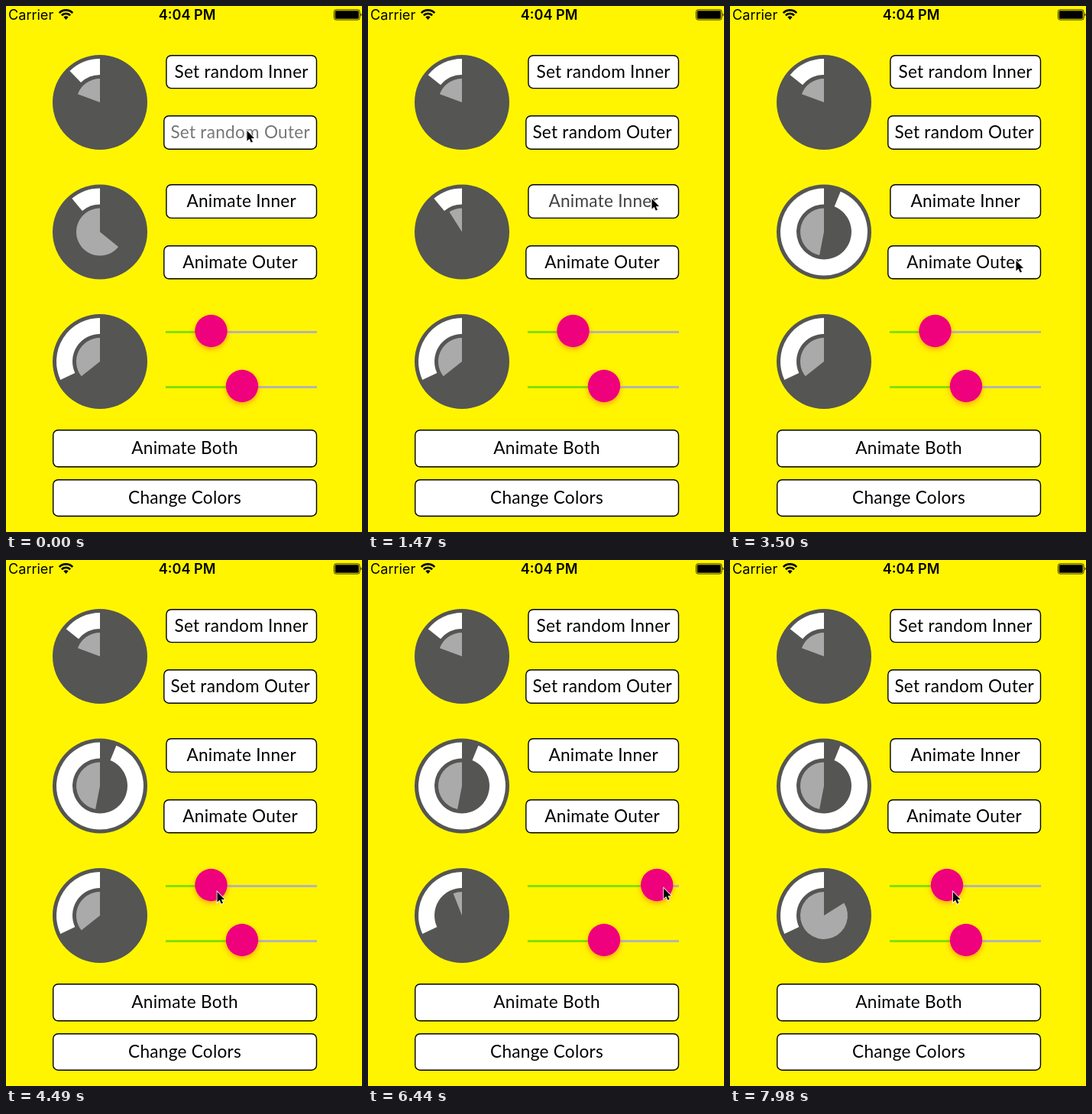
Write an HTML page that moves like this. It is 466x688 px and loops after 8 s.

```html
<!DOCTYPE html>
<html lang="en">
<head>
<meta charset="utf-8">
<title>Dial controls</title>
<style>
  html, body { margin: 0; width: 100%; height: 100%; overflow: hidden; background: #fff500; }
  svg { display: block; width: 466px; height: 688px; }
  .status { font: 18.1px Inter, Roboto, sans-serif; }
  .label { font: 22.6px Lato, "Open Sans", sans-serif; letter-spacing: .26px; text-anchor: middle; }
  .box { fill: #fff; stroke: #000; stroke-width: 1.4; }
  .thumb { fill: #ef007c; filter: drop-shadow(0 3.5px 3.5px rgba(255, 70, 40, .45)); }
</style>
</head>
<body>
<svg id="stage" viewBox="0 0 466 688" xmlns="http://www.w3.org/2000/svg">
  <g class="status">
    <text x="3" y="18">Carrier</text>
    <text x="237" y="18" text-anchor="middle" font-weight="600">4:04 PM</text>
  </g>
  <g fill="none" stroke="#000" stroke-width="2.7">
    <path d="M69.8 9.1A12 12 0 0 1 87.2 9.1M72.9 12.2A7.8 7.8 0 0 1 84.1 12.2"/>
    <path d="M78.5 18L75.4 14.6A4.4 4.4 0 0 1 81.6 14.6Z" fill="#000" stroke="none"/>
  </g>
  <rect x="429.5" y="4.9" width="33.5" height="13.2" rx="2.5" fill="none" stroke="#000" stroke-width=".8"/>
  <rect x="430.8" y="6.2" width="30.9" height="10.6" rx="1.3"/>
  <path d="M464.3 9.3Q466.5 11.5 464.3 13.7Z"/>
</svg>
<script>
const LOOP = 8000;
const MOVE = 450, FADE = 400;
const THUMB_LAG = 50, DIAL_LAG = 145;
const stage = document.getElementById('stage');

function add(tag, attrs, text) {
  const el = document.createElementNS('http://www.w3.org/2000/svg', tag);
  for (const key in attrs) el.setAttribute(key, attrs[key]);
  if (text) el.textContent = text;
  stage.append(el);
  return el;
}

function button(left, top, bottom, text) {
  const right = 406.5;
  add('rect', { x: left, y: top, width: right - left, height: bottom - top, rx: 6.5, class: 'box' });
  const x = (left + right) / 2;
  return add('text', { x, y: (top + bottom) / 2 + 7.5, class: 'label' }, text);
}

// Arc running counterclockwise from the top, in degrees.
function arc(cy, r, deg) {
  const a = deg * Math.PI / 180;
  const x = 123 - r * Math.sin(a), y = cy - r * Math.cos(a);
  return `123 ${cy - r}A${r} ${r} 0 ${deg > 180 ? 1 : 0} 0 ${x} ${y}`;
}

function dial(cy) {
  add('circle', { cx: 123, cy, r: 62, fill: '#555553' });
  const ring = add('path', { fill: 'none', stroke: '#fff', 'stroke-width': 21 });
  const pie = add('path', { fill: '#aaa' });
  return (outer, inner) => {
    ring.setAttribute('d', 'M' + arc(cy, 46.5, outer));
    pie.setAttribute('d', `M123 ${cy}L${arc(cy, 31, inner)}Z`);
  };
}

function slider(y) {
  add('rect', { x: 209, y, width: 198, height: 3, fill: '#b5b5b0' });
  const fill = add('rect', { x: 209, y, height: 3, fill: '#84e000' });
  const thumb = add('circle', { cy: y, r: 21.2, class: 'thumb' });
  return x => {
    fill.setAttribute('width', x - 209);
    thumb.setAttribute('cx', x);
  };
}

const clamp = p => Math.min(1, Math.max(0, p));
const mix = (a, b, p) => a + (b - a) * p;
const easeOut = p => 1 - (1 - clamp(p)) ** 3;
const easeBoth = p => (1 - Math.cos(Math.PI * clamp(p))) / 2;

// Where the pointer rests or turns: time, x, y.
const stops = [
  [560, 315.5, 163], [1090, 371.5, 252], [1950, 371.5, 252], [2270, 374.5, 333],
  [3850, 374.5, 333], [4460, 276.5, 434], [4520, 276.5, 434], [4800, 243, 430],
  [6200, 384, 428], [6610, 389, 430], [7370, 238, 432], [7750, 238, 432], [7930, 292, 434]
];
const GRAB = 4520;

function pointer(t) {
  let [, x, y] = stops[0];
  for (let i = 1; i < stops.length; i++) {
    const [start] = stops[i - 1], [end, toX, toY] = stops[i];
    const p = easeBoth((t - start) / (end - start));
    x = mix(x, toX, p);
    y = mix(y, toY, p);
  }
  return [x, y];
}

const thumbAt = t => pointer(Math.max(t, GRAB))[0] - 8;

// The dragged dial trails the thumb; sliding right empties it.
function dragAngle(t) {
  const angle = 360 * (1 - clamp((thumbAt(t - DIAL_LAG) - 230) / 156));
  return mix(128.4, angle, easeOut((t - GRAB - 20) / 250));
}

// Each tap: press time, release time, angle the dial then moves to.
const outerTaps = [[-250, -165, 34.5], [160, 230, 98], [410, 480, 51]];
const innerTaps = [[1100, 1200, 19], [1710, 1830, 169]];
const ringTaps = [[2290, 2440, 187], [3030, 3110, 338]];

const tapAngle = (from, taps, t) =>
  taps.reduce((angle, [, up, to]) => mix(angle, to, easeOut((t - up) / MOVE)), from);

function dimLabel(label, taps, t) {
  let alpha = 1;
  for (const [down, up] of taps) {
    if (t >= down) alpha = mix(.2, 1, clamp((t - up) / FADE));
  }
  label.setAttribute('fill-opacity', alpha);
}

const [topDial, midDial, lowDial] = [126, 295.5, 465].map(dial);

button(209.9, 64.7, 107.6, 'Set random Inner');
const setOuter = button(206.8, 143.7, 187.2, 'Set random Outer');
const animInner = button(209.9, 233.7, 277.4, 'Animate Inner');
const animOuter = button(206.8, 313.7, 356.8, 'Animate Outer');
button(61.7, 554.7, 602.8, 'Animate Both');
button(61.7, 619.7, 667.2, 'Change Colors');

const topSlider = slider(425);
slider(497)(309);

const cursor = add('path', {
  d: 'M0 0V13.6L3.1 10.8L5.2 15.6L7.5 14.7L5.4 10H9.5Z',
  stroke: '#fff', 'stroke-width': 1.6, 'paint-order': 'stroke'
});

function draw(t) {
  topDial(tapAngle(72, outerTaps, t), 69.8);
  midDial(tapAngle(40, ringTaps, t), tapAngle(231, innerTaps, t));
  lowDial(114.8, dragAngle(t));
  dimLabel(setOuter, outerTaps, t);
  dimLabel(animInner, innerTaps, t);
  dimLabel(animOuter, ringTaps, t);
  topSlider(thumbAt(t - THUMB_LAG));
  cursor.setAttribute('transform', `translate(${pointer(t)})`);
}

function tick(now) {
  draw(now % LOOP);
  requestAnimationFrame(tick);
}
draw(0);
requestAnimationFrame(tick);
</script>
</body>
</html>
```
